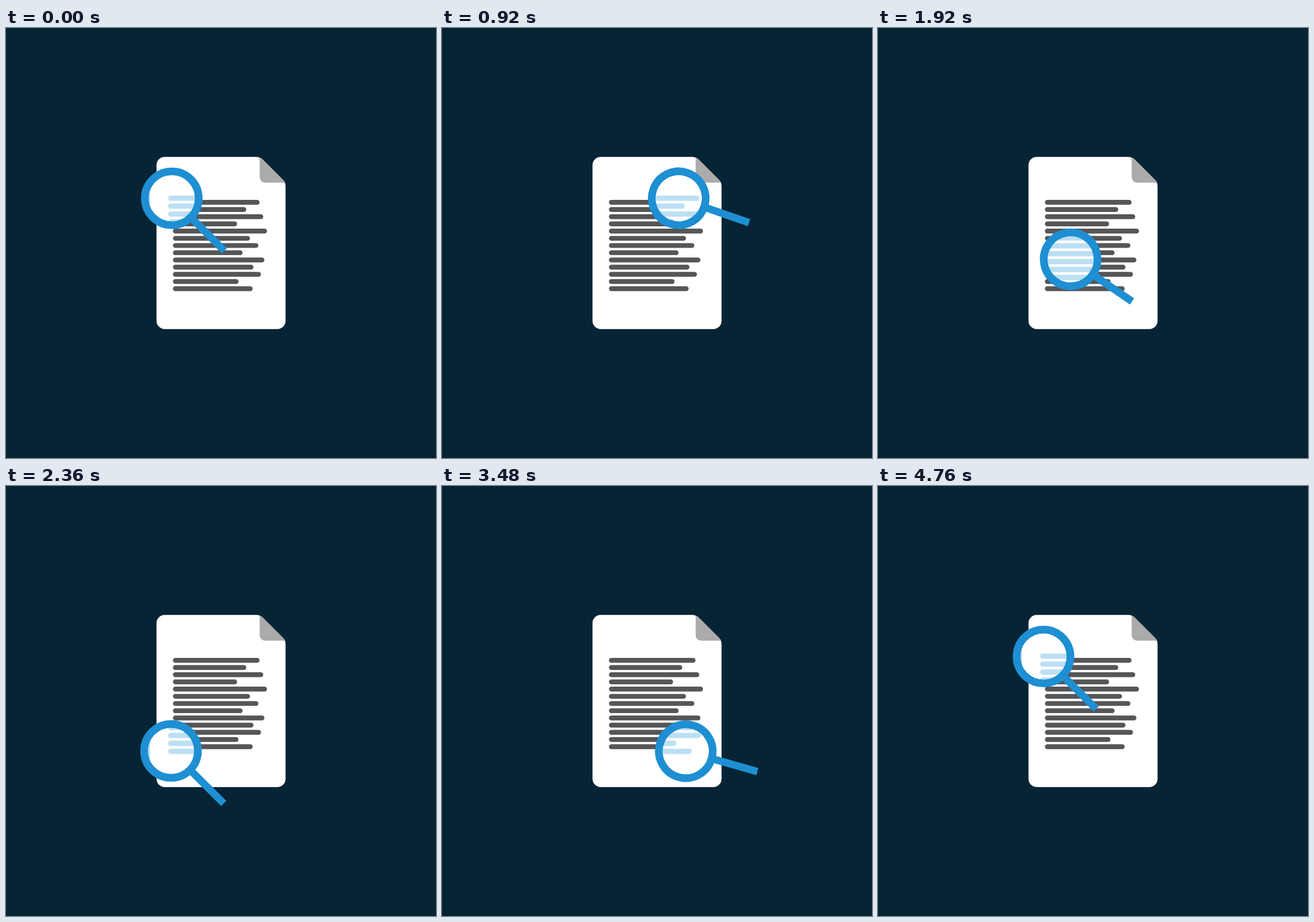
An HTML page that plays this animation: 748 by 748 pixels, repeating every 4.8 s.

```html
<!DOCTYPE html>
<html lang="en">
<head>
<meta charset="utf-8">
<title>Document search</title>
<style>
  html, body { margin: 0; width: 100%; height: 100%; overflow: hidden; background: #062434; }
  svg { display: block; width: 100%; height: 100%; }
</style>
</head>
<body>
<svg viewBox="0 0 748 748">
  <defs>
    <path id="page" d="M276 224.3H435Q442 224.3 446.5 228.8L482 264.2Q486.3 268.5 486.3 275V509.5A14.2 14.2 0 0 1 472.1 523.7H276A14.2 14.2 0 0 1 261.8 509.5V238.5A14.2 14.2 0 0 1 276 224.3Z"/>
    <g id="lines" stroke-width="8.4" stroke-linecap="round"></g>
    <clipPath id="pageClip"><use href="#page"/></clipPath>
    <clipPath id="lensClip"><circle id="hole" r="43"/></clipPath>
  </defs>
  <use href="#page" fill="#fff"/>
  <path d="M441.3 224V260A9 9 0 0 0 450.3 269H488V224Z" fill="#acabac" clip-path="url(#pageClip)"/>
  <use href="#lines" stroke="#565557"/>

  <!-- Enlarged page seen through the glass -->
  <g clip-path="url(#lensClip)">
    <rect width="748" height="748" fill="#bcdff3"/>
    <g transform="translate(374 374) scale(1.1) translate(-374 -374)">
      <use href="#page" fill="#fff"/>
      <use href="#lines" stroke="#bcdff3"/>
    </g>
  </g>
  <g id="glass" fill="none" stroke="#1e8fd2">
    <circle r="46.8" stroke-width="13.4"/>
    <path d="M48 0H129.5" stroke-width="13"/>
  </g>
</svg>
<script>
  const LOOP = 4800, LEG = 1200, STEP = 40;
  const find = id => document.getElementById(id);

  const lineEnds = [441, 418, 447.5, 402, 454, 424.5, 439, 411.5, 449.5, 430.5, 443.5, 404.5, 429];
  find('lines').innerHTML = lineEnds.map((end, i) =>
    `<path d="M294.6 ${303.2 + i * 12.53}H${end - 4.2}"/>`).join('');

  // Corners of the sweep: position of the lens and angle of the handle
  const stops = [
    [288.4, 296.2, 45], [431.5, 296.2, 15],
    [286.7, 461.4, 45], [428, 461.4, 15], [287.6, 296, 45]
  ];

  function pose(time) {
    const leg = Math.floor(time / LEG);
    const s = time % LEG / LEG;
    const p = s * s * (3 - 2 * s);
    const [from, to] = [stops[leg], stops[leg + 1]];
    let [x, y, angle] = from.map((v, i) => v + (to[i] - v) * p);
    if (leg % 2) { // the diagonals bend in a slight S
      const bend = p * (1 - p) * (1 - 2 * p);
      x += 38 * bend;
      y += 13 * bend * Math.sign(to[1] - from[1]);
    }
    return { x, y, angle };
  }

  function draw() {
    const time = Math.floor(performance.now() % LOOP / STEP) * STEP;
    const { x, y, angle } = pose(time);
    find('hole').setAttribute('transform', `translate(${x} ${y})`);
    find('glass').setAttribute('transform', `translate(${x} ${y}) rotate(${angle})`);
    requestAnimationFrame(draw);
  }
  draw();
</script>
</body>
</html>
```
